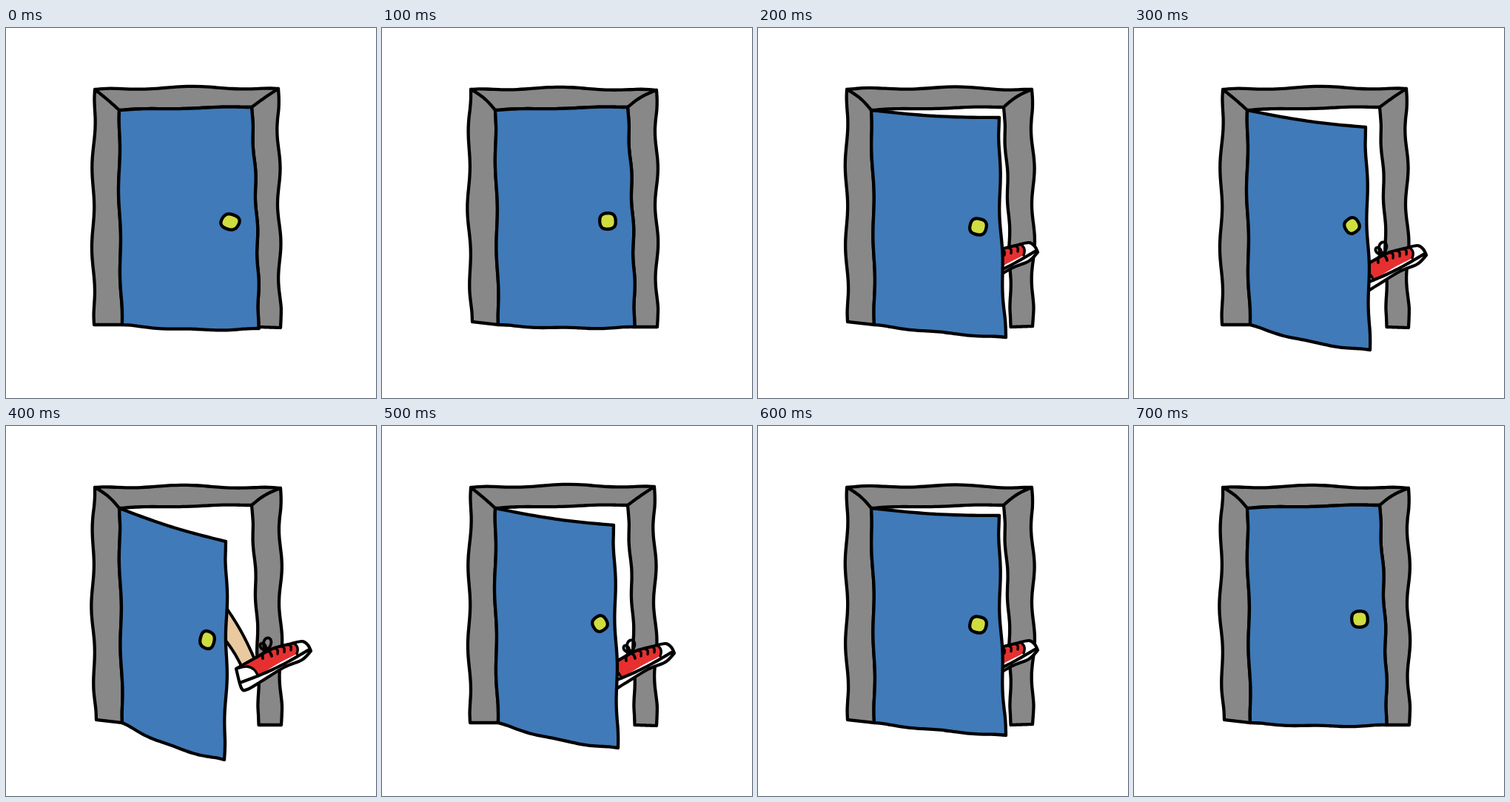
An HTML page with a canvas for the animation above (800 ms loop, 500x500 px).

```html
<!DOCTYPE html>
<html lang="en">
<head>
<meta charset="utf-8">
<title>Door</title>
<style>
  html, body { margin: 0; width: 100%; height: 100%; overflow: hidden; background: #fff; }
  canvas { display: block; width: 100vw; height: 100vh; }
</style>
</head>
<body>
<canvas id="stage" width="500" height="500"></canvas>
<script>
const ctx = document.getElementById('stage').getContext('2d');
const INK = '#000', GREY = '#888', BLUE = '#407ab8', YELLOW = '#cfdd40';
const RED = '#e6302f', SKIN = '#e9c9a0', WHITE = '#fff';
const LINE = 4.3, STEP = 100, TAU = Math.PI * 2;

// Corners of the opening and of the frame's fixed outer corner.
const TL = [153, 111], TR = [332, 107], BL = [157, 401], BR = [341.5, 404];
const OUTER = [120, 83];

// A hand-drawn stroke: a straight run with a bow and a wave.
// Positive offsets go right on downward strokes, up on rightward ones.
function stroke(a, b, bow = 0, amp = 0, cycles = 1, peak = 0) {
  const dx = b[0] - a[0], dy = b[1] - a[1], len = Math.hypot(dx, dy), n = 24;
  return Array.from({ length: n + 1 }, (_, i) => {
    const t = i / n, taper = Math.min(1, 10 * t, 10 * (1 - t));
    const off = bow * Math.sin(Math.PI * t) + amp * taper * Math.cos(TAU * cycles * (t - peak));
    return [a[0] + dx * t + dy / len * off, a[1] + dy * t - dx / len * off];
  });
}

function makeFrame({ tr, bl, br, leftBow, leftPeak, rightBow, topPeak, hingeBow, hingePeak, miter }) {
  return {
    left: stroke(OUTER, bl, leftBow, 1.7, 2.85, leftPeak),
    top: stroke(OUTER, tr, 2.2, 1.5, 1.9, topPeak),
    right: stroke(tr, br, rightBow, 2, 3.2, 0.33),
    footL: stroke(bl, BL),
    footR: stroke(BR, br),
    hinge: stroke(TL, BL, hingeBow, 1.1, 2.5, hingePeak),
    lintel: stroke(TL, TR, 0.8, 0.7, 1.5, 0.15),
    jamb: stroke(TR, BR, 2, 1, 4, 0.3),
    miterL: stroke(OUTER, TL, miter),
    miterR: stroke(TR, tr, miter)
  };
}

const calm = makeFrame({ tr: [368, 82], bl: [119, 401], br: [371, 405], leftBow: -2, leftPeak: 0.15,
  rightBow: -0.5, topPeak: 0.53, hingeBow: -1.5, hingePeak: 0.58, miter: 0.5 });
const shaken = makeFrame({ tr: [371, 84], bl: [122, 397], br: [372, 404], leftBow: -4, leftPeak: 0.34,
  rightBow: -0.5, topPeak: 0.48, hingeBow: 0, hingePeak: 0.45, miter: 2.5 });
const pushed = makeFrame({ tr: [370, 83], bl: [121, 397], br: [371, 403], leftBow: -1, leftPeak: 0.15,
  rightBow: 1.5, topPeak: 0.6, hingeBow: 1.2, hingePeak: 0.39, miter: 2.5 });

// Poses from shut to wide open; top and foot end the door's free edge.
const poses = [
  { frame: calm, foot: [342, 406], sag: 4, knob: [303, 262, 12.5, 10.5] },
  { frame: shaken, foot: [341, 404], sag: 3, knob: [305, 261, 11.2, 11.2] },
  { frame: pushed, top: [326, 121], foot: [335, 418], sag: 2, bow: -2.5, knob: [297.5, 268.5, 11.5, 11.2], kick: [-34, -1] },
  { frame: calm, top: [313, 134], foot: [319, 435], sag: 6, bow: 0, knob: [294.5, 267, 10, 10.5], kick: [-17, 3] },
  { frame: shaken, top: [297, 156], foot: [295, 451], sag: 7, bow: 2, knob: [272, 289, 9.8, 12], kick: [0, 0] }
];

const flip = pts => [...pts].reverse();

// Smooth spline through a list of points.
function trace(pts, start) {
  const at = i => pts[Math.max(0, Math.min(pts.length - 1, i))];
  if (start) ctx.moveTo(...pts[0]); else ctx.lineTo(...pts[0]);
  for (let i = 0; i < pts.length - 1; i++) {
    const [a, b, c, d] = [at(i - 1), at(i), at(i + 1), at(i + 2)];
    ctx.bezierCurveTo(
      b[0] + (c[0] - a[0]) / 6, b[1] + (c[1] - a[1]) / 6,
      c[0] - (d[0] - b[0]) / 6, c[1] - (d[1] - b[1]) / 6, ...c);
  }
}

function fill(color, ...edges) {
  ctx.beginPath();
  edges.forEach((e, i) => trace(e, i === 0));
  ctx.closePath();
  ctx.fillStyle = color;
  ctx.fill();
}

function ink(width, ...edges) {
  ctx.beginPath();
  edges.forEach(e => trace(e, true));
  ctx.lineWidth = width;
  ctx.strokeStyle = INK;
  ctx.stroke();
}

function drawFrame(f) {
  fill(GREY, flip(f.left), f.top, f.right, flip(f.footR), flip(f.jamb),
    flip(f.lintel), f.hinge, flip(f.footL));
  ink(LINE, ...Object.values(f));
}

function drawDoor({ frame, top, foot, sag, bow, knob }) {
  const head = top ? stroke(TL, top, -3) : frame.lintel;
  const edge = top ? stroke(top, foot, bow, 1.2, 2.7, 0.25) : frame.jamb;
  const base = stroke(BL, foot, -sag, 0.8, 2, 0);
  fill(BLUE, head, edge, flip(base), flip(frame.hinge));
  ink(LINE, head, edge, base, frame.hinge);

  const [x, y, rx, ry] = knob;
  const ring = Array.from({ length: 25 }, (_, i) => {
    const a = i / 24 * TAU, r = 1 + 0.04 * Math.cos(4 * a + x);
    return [x + rx * r * Math.cos(a), y + ry * r * Math.sin(a)];
  });
  fill(YELLOW, ring);
  ink(LINE, ring);
}

function drawLeg() {
  const calf = stroke([298, 246], [335, 313], 2);
  const shin = stroke([297, 290], [318, 324], 1);
  fill(SKIN, calf, flip(shin));
  ink(4, calf, shin);
}

function drawShoe() {
  const heel = [311, 328], toe = [412, 304];
  const upper = [heel, [334, 315], [360, 301], [382, 295], [400, 291], [408, 296], toe];
  const sole = [toe, [400, 316], [376, 326], [345, 345], [326, 356], [318, 354], heel];
  const seam = stroke([316, 347], [408, 303], -3);
  const cap = stroke([389, 293], [393, 308], 3);
  const counter = [heel, [325, 325], [335, 329], [341, 338]];

  fill(WHITE, upper, sole);
  fill(RED, [[323, 322], ...upper.slice(1, 4), cap[0]], cap, [[393, 308], [366, 322], [341, 338]],
    flip(counter.slice(1)));
  ink(4.2, upper, sole, seam);
  ink(3.4, cap, counter);
}

function drawLaces() {
  for (let i = 0; i < 3; i++) {
    const x = 363 + 9 * i, y = 300 - 2.5 * i;
    ink(3.4, [[x, y], [x + 4, y + 3], [x + 4, y + 8]]);
  }
  const knot = [351, 303];
  const loop = (angle, size) => Array.from({ length: 13 }, (_, i) => {
    const t = i / 12 * Math.PI, r = size * Math.sin(t), a = angle + (t - Math.PI / 2) * 0.55;
    return [knot[0] + r * Math.cos(a), knot[1] + r * Math.sin(a)];
  });
  ink(3.8, loop(-1.35, 17), loop(-2.2, 11),
    stroke(knot, [347, 314], -2), stroke(knot, [359, 311], 2));
}

function draw(ms) {
  const step = Math.floor(ms / STEP) % 8;
  const pose = poses[4 - Math.abs(4 - step)];
  ctx.fillStyle = WHITE;
  ctx.fillRect(0, 0, 500, 500);
  drawFrame(pose.frame);
  if (pose.kick) {
    ctx.save();
    ctx.translate(...pose.kick);
    drawLeg();
    drawShoe();
    drawLaces();
    ctx.restore();
  }
  drawDoor(pose);
}

ctx.lineCap = ctx.lineJoin = 'round';
let begin = null;
function tick(now) {
  if (begin === null) begin = now;
  draw(now - begin);
  requestAnimationFrame(tick);
}
draw(0);
requestAnimationFrame(tick);
</script>
</body>
</html>
```
